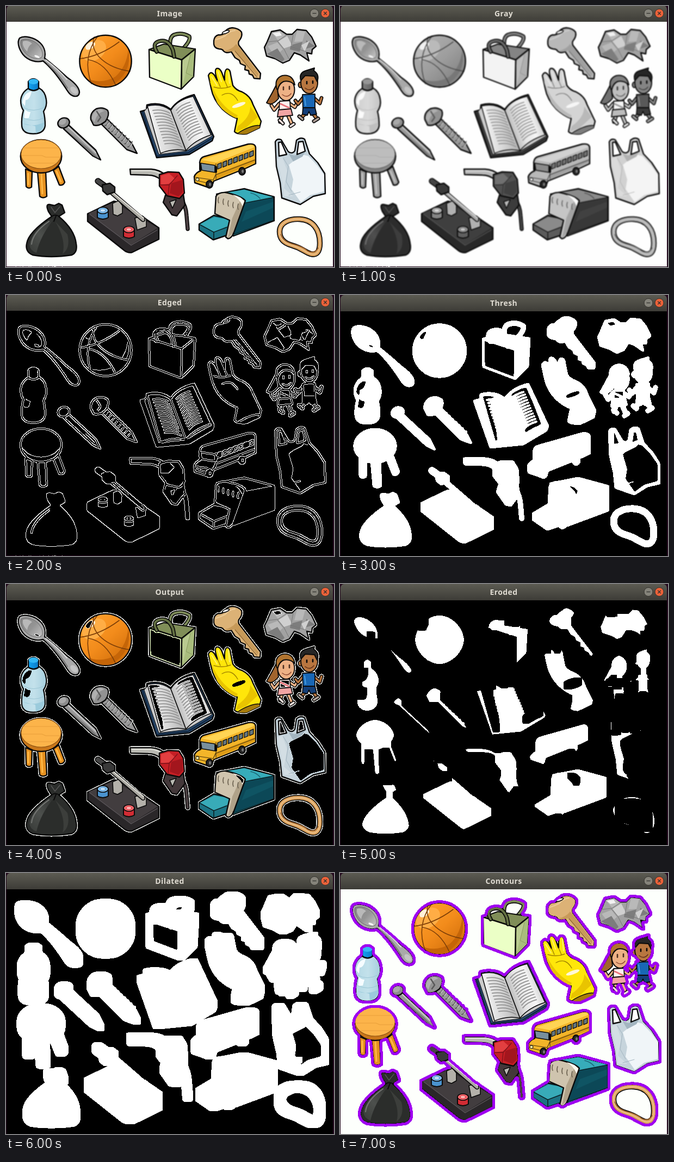
Recreate the animation shown at these times as an HTML page with a canvas. Size 603 px wide and 480 px high, loop 8000 ms.

```html
<!DOCTYPE html>
<html lang="en">
<head>
<meta charset="utf-8">
<title>Image processing steps</title>
<style>
  html, body { margin: 0; width: 100%; height: 100%; overflow: hidden; background: #2c001e; }
  canvas { display: block; width: 100vw; height: 100vh; }
</style>
</head>
<body>
<canvas id="stage" width="603" height="480"></canvas>
<script>
const W = 600, H = 450, N = W * H, INK = '#0a0a0a', EDGE = 2.4;
const screen2d = document.getElementById('stage').getContext('2d');
const sceneCanvas = Object.assign(document.createElement('canvas'), { width: W, height: H });
const ctx = sceneCanvas.getContext('2d', { willReadFrequently: true });

// ---------- drawing helpers (stage coordinates) ----------
function paint(path, fill, width, color) {
  if (fill) { ctx.fillStyle = fill; ctx.fill(path); }
  if (width) { ctx.lineWidth = width; ctx.strokeStyle = color; ctx.stroke(path); }
}
const shape = (fill, d, width = 0, color = INK) => paint(new Path2D(d), fill, width, color);
const line = (color, width, d) => shape(null, d, width, color);
const tube = (color, width, d) => { line(INK, width + 3.4, d); line(color, width, d); };
function oval(fill, x, y, rx, ry, turn = 0, width = 0, color = INK) {
  const path = new Path2D();
  path.ellipse(x, y, rx, ry, turn, 0, 7);
  paint(path, fill, width, color);
}
function blend(x0, y0, x1, y1, ...colors) {
  const g = ctx.createLinearGradient(x0, y0, x1, y1);
  colors.forEach((c, i) => g.addColorStop(i / (colors.length - 1), c));
  return g;
}
function inside(d, draw) {
  ctx.save();
  ctx.clip(new Path2D(d));
  draw();
  ctx.restore();
}

// ---------- the objects ----------
function spoon() {
  shape('#a9a9a9', 'M25 59C33 54 52 57 63 68C72 77 73 88 71 96C85 107 100 120 112 131C125 140 135 150 135 159Q134 167 126 166C117 165 113 156 107 147C97 132 84 114 68 101C56 105 40 100 31 89C23 78 20 66 25 59Z', EDGE);
  shape(blend(30, 62, 66, 96, '#858585', '#949494', '#c4c4c4'), 'M28 63C36 58 50 62 59 71C67 80 69 90 65 95C56 99 43 95 35 86C28 78 25 68 28 63Z', 1, '#6a6a6a');
  shape('#b9b9b9', 'M31 65Q40 62 48 69Q40 74 39 84Q29 74 31 65Z');
  oval('#f4f4f4', 57, 93, 5, 2, .4);
  line('#ddd', 2, 'M73 99Q96 116 112 135');
  line('#777', 2, 'M76 106Q99 127 113 151');
  oval('#c4c4c4', 125, 155, 8, 5, .8);
}

function basketball() {
  oval(blend(150, 62, 220, 140, '#ffa02c', '#f28b1b', '#cf6d0a'), 183, 101.5, 47.7, 47.7);
  shape('#c56508', 'M225 79Q233 126 191 148Q162 151 147 133Q176 145 201 130Q222 112 225 79Z');
  oval('#ffad45', 162, 82, 24, 17, -.6);
  oval('#fff0d8', 155, 73, 10, 6, -.6);
  line('#7d3f08', 1.6, 'M169 55Q139 95 157 143M162 57C152 88 186 114 228 120M135 97Q172 93 208 66M152 99Q183 104 202 146');
  oval(null, 183, 101.5, 47.7, 47.7, 0, EDGE);
}

function paperBag() {
  tube('#7c8a58', 4, 'M302 76Q300 57 309 53Q323 48 337 56Q340 63 325 79');
  shape('#808e58', 'M263 80L290 70L348 79L323 99Z', 2);
  shape('#a9bd7d', 'M323 99L348 79L345 130L322 153Z', EDGE);
  shape('#b9ca90', 'M325 101L339 90L331 121L325 145Z');
  line('#8b9c62', 1, 'M339 90L331 123L345 130');
  shape('#ebffc6', 'M263 80L323 99L322 153L264 131Z', EDGE);
  tube('#647143', 4, 'M277 84Q268 69 281 65Q299 60 307 82L309 93');
}

function key() {
  shape('#dcb276', 'M382 64Q383 55 391 53Q397 54 401 50Q405 41 416 40Q428 41 433 48Q435 55 430 62Q426 66 428 72L468 124L467 134L456 133L453 127L447 125L446 119L439 117L440 110L431 106L429 100L421 95L414 84Q405 88 400 83Q398 79 392 79Q383 78 382 70Z', EDGE);
  shape('#c79a59', 'M403 82Q415 80 423 70L428 75L464 124L463 129L420 82Q408 86 403 82Z');
  line('#eccb98', 2, 'M386 62Q395 59 403 55Q410 46 421 45');
  line('#8d6632', 1.2, 'M421 83L461 130');
  oval('#fff', 404, 48, 7, 2.5, -.35, 1.6);
}

function foil() {
  shape('#a2a2a2', 'M475 76L480 66L488 47L504 44L516 52L526 52L535 43L552 45L562 57L570 74L563 80L562 88L553 86L557 101L541 90L530 86L521 100L509 105L495 97L479 92Z', EDGE);
  shape('#b9b9b9', 'M489 49L503 46L514 54L500 63ZM481 74L499 67L509 80L495 92ZM535 46L550 47L545 65L530 66Z');
  shape('#7d7d7d', 'M480 88L499 78L512 98L507 103ZM523 72L545 66L540 84L522 80ZM552 63L568 74L550 79Z');
  shape('#d0d0d0', 'M501 65L517 55L526 73L511 78ZM543 72L558 64L549 84Z');
  shape('#f2f2f2', 'M490 50L503 48L507 54L497 56Z');
  line('#777', 1, 'M481 66L500 64L516 53M499 65L511 79L521 99M528 52L524 75L552 84');
}

function bottle() {
  shape(blend(28, 0, 75, 0, '#b4d9e5', '#c3e1eb', '#a5cedd'), 'M42 151Q28 159 27 174Q27 185 32 192Q28 205 29 221Q31 235 50 235Q70 235 72 220Q72 205 69 194Q76 184 74 172Q72 157 61 151Z', EDGE);
  shape('#f6fcff', 'M47 157Q32 160 30 178L35 184L36 173Q44 173 47 157ZM35 190Q39 195 45 195L42 206L33 207Z');
  shape('#9bcbdc', 'M31 216Q48 224 70 214Q69 229 55 234L54 221Z');
  line('#9cc7d6', 1, 'M32 206Q52 215 69 206M33 187Q50 197 71 186');
  shape(blend(41, 0, 60, 0, '#12a5f2', '#0b79c8'), 'M41 139Q50 129 60 139V152Q51 159 41 152Z', EDGE);
  oval('#32b7f5', 50.5, 139, 9, 5);
}

function nail() {
  shape('#999', 'M112 216L165 265L174 283L160 276L106 226Z', EDGE);
  line('#c8c8c8', 2, 'M113 221L165 270');
  shape('#747474', 'M108 226L159 274L171 281L154 264Z');
  oval('#8c8c8c', 106, 215, 11, 9, -.4, EDGE);
  oval('#a9a9a9', 104, 213, 7, 5, -.5);
}

function screw() {
  shape('#999', 'M184 206L231 252L241 271L222 264L176 218Z', EDGE);
  for (let i = 0; i < 8; i++) {
    const x = 182 + i * 6, y = 220 + i * 5.6;
    line('#5a5a5a', 1.8, `M${x} ${y}Q${x + 5} ${y - 1} ${x + 8} ${y - 10}`);
    line('#c5c5c5', 1.5, `M${x + 4} ${y - 1}L${x + 8} ${y - 6}`);
  }
  shape('#929292', 'M156 209Q154 196 166 189Q178 185 187 192Q191 200 183 212Q171 222 161 219Z', EDGE);
  shape('#b0b0b0', 'M158 207Q159 192 174 190L181 193Q166 197 163 214Z');
  line('#5a5a5a', 2.5, 'M167 194L174 205L169 212');
}

function book() {
  shape('#28486b', 'M247 194L258 191L259 182Q284 175 303 190Q317 170 346 163L382 240L379 248L337 273L277 279Z', EDGE);
  shape('#cbcbcb', 'M254 194L281 273L331 267L379 239L344 166L303 192L263 184Z', 1);
  shape(blend(265, 220, 323, 215, '#f4f4f4', '#d9d9d9', '#b4b4b4'), 'M260 184Q285 178 303 192L331 266Q308 261 284 271Z', 1.5);
  shape(blend(310, 222, 368, 200, '#b4b4b4', '#e6e6e6', '#f6f6f6', '#c9c9c9'), 'M303 192Q314 173 344 166L377 237Q346 247 331 266Z', 1.5);
  for (let i = 0; i < 12; i++) {
    const y = 192 + i * 5.6, x = 270 + i * 2, rx = 313 + i * 2.1, ry = 192 + i * 5;
    line('#999', 2, `M${x} ${y}Q${x + 17} ${y - 3} ${x + 31} ${y + 5}`);
    line('#999', 2, `M${rx} ${ry}Q${rx + 9} ${ry - 11} ${rx + 25} ${ry - 15}`);
  }
  line('#0d2139', 2, 'M251 195L277 276L335 270L379 243');
}

function glove() {
  const hand = 'M372 128Q376 118 383 127L389 138Q382 118 387 115Q393 113 397 123L402 137Q401 118 406 116Q412 115 413 126L417 146Q423 155 434 158Q450 166 454 181L469 212L466 224L443 235Q425 237 420 231L425 207Q411 202 397 189Q381 172 377 151Z';
  shape('#ffe60a', hand, EDGE);
  inside(hand, () => {
    shape('#e9c400', 'M372 132L383 157Q399 188 426 201L418 220L395 198ZM449 185Q449 205 426 221L423 231L441 224L463 204Z');
    oval('#a87c0c', 444, 232, 26, 7, -.42, 1.5);
    oval('#fff8d8', 428, 182, 13, 3.5, -.35);
  });
  line('#a08200', 1.4, 'M389 137L394 149M402 137L407 149M382 149Q398 154 413 148M397 164Q415 154 426 174');
  line('#fff26b', 2, 'M390 121L396 139M409 121L411 142M378 130L388 146');
}

function girl() {
  const skin = '#edb185';
  shape('#a1642d', 'M498 143Q489 161 479 178Q489 185 501 170Z', 2);
  tube(skin, 3.5, 'M502 180L493 191L488 183');
  tube(skin, 3.5, 'M522 180L531 186L535 179');
  tube(skin, 4, 'M507 203L504 213');
  tube(skin, 4, 'M519 202L525 216');
  tube('#eee0dc', 3.5, 'M503 210L509 216');
  tube('#eee0dc', 3.5, 'M523 221L529 217');
  shape('#fff0ee', 'M503 175L522 174L523 192L502 194Z', 1.8);
  shape('#f2a5a4', 'M501 191L524 189L527 201L499 204Z', 1.8);
  line('#e77178', 3, 'M505 180L520 187');
  oval(skin, 515, 154, 15.5, 20, 0, 2);
  shape('#b1742f', 'M498 153Q492 134 508 128Q527 125 531 145Q521 136 510 139Q502 143 500 153Z', 2);
  line('#4d3022', 2.6, 'M510 149V154M521 148V153');
  line('#8d4932', 1.5, 'M508 163Q517 170 524 161');
}

function boy() {
  const skin = '#b87640';
  tube(skin, 3.5, 'M546 169L537 180L532 174');
  tube(skin, 3.5, 'M567 170L577 179L580 169');
  tube(skin, 4, 'M551 197L543 205');
  tube(skin, 4, 'M564 197L570 205');
  tube('#b1a29a', 3.5, 'M539 203L545 208');
  tube('#b1a29a', 3.5, 'M566 212L574 207');
  shape('#1967b5', 'M545 163L568 162L568 190L546 190Z', 1.8);
  shape('#143f78', 'M546 187L568 187L571 199L560 201L557 194L554 201L545 199Z', 1.8);
  line('#479de0', 2, 'M549 168L551 183');
  oval(skin, 541, 145, 3.5, 5, 0, 2);
  oval(skin, 557.5, 141, 15.5, 20, 0, 2);
  shape('#262626', 'M542 137Q538 123 551 119L567 114L566 119Q577 126 572 139L567 129L550 128Z', 2);
  line(INK, 2.6, 'M553 139V143M564 138V142');
  line('#5e2f19', 1.5, 'M550 151Q559 158 566 149');
}

function stool() {
  shape('#e5901f', 'M36 300L48 305L47 333Q41 337 37 332ZM58 305L73 304L75 350Q68 355 62 350ZM87 302L97 295L108 324Q105 331 98 329Z', EDGE);
  line('#ffb845', 3, 'M41 308V328M65 309L67 345M93 304L101 323');
  oval('#c9771a', 64.5, 276.5, 37.8, 30.5, 0, EDGE);
  oval('#fcb44a', 64.5, 272.5, 36.8, 26.5, 0, 1.2, '#8f5313');
  line('#e9a03a', 1.2, 'M32 261H97M29 275H66L73 278H99M37 289H92');
}

function bus() {
  shape('#f3b529', 'M356 288Q357 279 364 277L445 254Q458 252 459 260V290L442 298L382 322Q379 334 370 333L347 325L346 314Q349 306 358 303Z', EDGE);
  shape('#ffd454', 'M359 283L446 256Q456 255 456 260L386 288Z');
  shape('#de9c17', 'M387 308L457 281V288L387 318Z');
  shape('#788f9d', 'M358 289L384 293V306L360 302Z', 1.6);
  for (let i = 0; i < 7; i++) {
    const x = 389 + i * 9.8, y = 291 - i * 3.7;
    shape('#64767e', `M${x} ${y}l7 -3v9l-7 3Z`, 1.3);
  }
  line('#4a360c', 1.2, 'M386 290V318M387 310L458 283M348 315L381 320L386 309M351 321L376 327');
  oval('#fff0a2', 352, 319, 3, 3, 0, 1);
  oval('#252525', 374, 328, 6, 7, 0, 2);
  oval('#777', 375, 328, 2, 3);
  oval('#252525', 434, 304, 6, 7, 0, 2);
  oval('#777', 435, 304, 2, 3);
  line(INK, 4, 'M386 296V305M357 291V301');
}

function plasticBag() {
  shape('#c6d4dc', 'M495 250Q498 243 506 246L519 268Q527 273 531 266L534 247Q542 240 549 245L558 272L573 288L586 308L587 345L565 350L541 365L507 353L504 325L497 295Z', EDGE);
  shape('#f0f5f8', 'M520 292L544 273L556 276L572 293L585 311L584 341L559 348L542 361L525 337L528 319Z');
  shape('#d3dee4', 'M498 281L508 278L517 303L511 335L528 350L511 350L508 325Z');
  shape('#a3b5c0', 'M519 271L530 275L550 268L545 277L528 286Z');
  shape('#fff', 'M501 251L506 250L516 273L502 276ZM538 250L546 249L550 267L535 273Z', EDGE);
  line('#a3b5c0', 1, 'M510 280L519 295L515 323L525 341M520 348L541 342');
}

function trashBag() {
  shape('#2b2d2b', 'M84 387L78 378Q72 364 80 365L89 367L97 363L103 366L108 380L97 387Q126 411 129 437Q132 453 121 458Q82 464 49 458Q35 452 38 437Q41 416 84 387Z', EDGE);
  shape(blend(43, 450, 93, 405, '#3a3d3a', '#4d504d', '#343634'), 'M82 392Q48 414 43 439Q44 450 56 454Q63 423 88 392Z');
  shape('#3c3e3b', 'M91 397L113 420Q119 445 104 456Q111 431 91 397Z');
  line('#757774', 2, 'M79 396Q49 417 47 438');
  line('#555', 1.5, 'M83 370L90 380L99 369');
  line(INK, 2, 'M84 387Q90 382 98 387M92 386L88 396');
}

function knifeSwitch() {
  shape('#2a2729', 'M150 382L198 359Q210 359 281 408V429L232 453Q225 455 218 450L150 396Z', EDGE);
  shape('#423d3f', 'M152 381L199 361L279 408L230 439Z');
  line('#5d585c', 1.3, 'M154 383L230 440L278 412');
  shape('#b4b1aa', 'M196 363L207 358L214 367V381L205 386L197 383Z', 1.6);
  shape('#b4b1aa', 'M237 390L251 386L258 392V406L241 412Z', 1.6);
  tube('#aaa8a1', 5, 'M195 344L252 393');
  line('#e1e0d9', 2, 'M195 342L253 390');
  tube('#444', 8, 'M169 322L183 332');
  shape('#393939', 'M177 329L191 326L200 333V342L186 347L178 340Z', EDGE);
  for (const [x, y, dark, light, top] of [[178, 380, '#4a93cf', '#82bdec', '#c5e0f6'], [226, 415, '#d22c34', '#f4676b', '#fbb3b3']]) {
    shape(dark, `M${x - 10} ${y - 4}V${y + 9}Q${x} ${y + 15} ${x + 10} ${y + 9}V${y - 4}Z`, 2);
    oval(light, x, y - 4, 10, 6, 0, 1.6);
    oval(top, x, y - 4, 5, 3, 0, 1, dark);
  }
}

function nozzle() {
  tube('#4c4143', 4, 'M322 357Q331 367 332 386L334 410');
  shape('#b9b9b2', 'M228 300L267 300Q282 301 292 310L284 319Q274 311 262 311L229 310Z', EDGE);
  line('#e0e0d9', 2, 'M232 303H266Q279 304 288 311');
  shape('#43383a', 'M293 348L289 361L305 384L314 386L329 366L326 346Z', EDGE);
  shape('#b9b9b2', 'M301 360L313 356L306 372Z', 1.5);
  shape('#c51f25', 'M282 310L298 305L318 306L326 319L328 344L319 354L296 349L282 331Z', EDGE);
  shape('#e23f40', 'M285 312L300 308L311 318L299 327L285 329Z');
  shape('#a3161d', 'M304 326L324 320L325 342L317 350L301 344Z');
  line('#7a1219', 1.3, 'M283 329L300 329L315 312M300 329L298 348');
}

function tealBox() {
  shape('#218d9c', 'M387 346L438 336L493 351V395L418 423L400 380Z', EDGE);
  shape('#37acba', 'M397 344L438 338L490 351L440 361Z');
  shape('#0c4857', 'M440 362L492 352V394L419 420Z', 1);
  shape('#0f5463', 'M441 378L491 360V371L433 397Z');
  line('#1c6674', 1.6, 'M450 344Q460 346 467 354');
  shape('#1c7383', 'M355 401L382 385L414 392L408 421L381 430L355 412Z', EDGE);
  shape('#38abb8', 'M357 401L383 388L412 393L407 405L382 415Z');
  line(INK, 1.3, 'M356 402L382 416L406 407M382 416V428');
  shape('#cfc4ae', 'M386 350Q391 342 404 343Q432 349 440 358L419 415Q416 427 408 428L404 425L411 394L384 382Z', EDGE);
  shape('#b0a289', 'M432 355L438 360L418 416L408 427L416 390Z');
  shape('#fffaf0', 'M417 347Q432 350 438 359L435 368Q429 354 417 347Z');
  for (let i = 0; i < 5; i++) line('#736957', 1.8, `M${391 + i * 9} ${352 + i * 3}q-2 6 0 10`);
}

function rubberBand() {
  const loop = 'M503 415C503 397 523 391 540 392C564 393 577 411 577 436C577 452 571 459 560 456C548 452 546 446 525 440C511 436 503 428 503 415Z';
  tube('#d99f5a', 7, loop);
  line('#eec28a', 2, loop);
  line('#8b5527', 1.5, 'M505 420Q509 432 525 437Q548 443 554 450Q566 457 574 445');
}

function drawScene() {
  ctx.fillStyle = '#fdfffc';
  ctx.fillRect(0, 0, W, H);
  ctx.translate(-1, -29);
  ctx.lineJoin = ctx.lineCap = 'round';
  [spoon, basketball, paperBag, key, foil, bottle, nail, screw, book, glove, girl, boy,
    stool, bus, plasticBag, trashBag, knifeSwitch, nozzle, tealBox, rubberBand].forEach(draw => draw());
  return ctx.getImageData(0, 0, W, H);
}

// ---------- image processing ----------
const around = [-W - 1, -W, -W + 1, -1, 1, W - 1, W, W + 1];
const blur = (a, step) => a.map((_, i) =>
  [1, 4, 6, 4, 1].reduce((sum, k, j) => sum + k * (a[i + (j - 2) * step] ?? 254), 0) / 16);

function spread(a, n, pick) {
  const along = (src, step) => src.map((v, i) => {
    for (let j = -n; j <= n; j++) v = pick(v, src[i + j * step] ?? v);
    return v;
  });
  return along(along(a, 1), W);
}

// Grow a region from its seeds through every accepted pixel.
function flood(seeds, steps, accept) {
  const seen = new Uint8Array(N), stack = [...seeds];
  stack.forEach(i => seen[i] = 1);
  while (stack.length) {
    const i = stack.pop();
    for (const step of steps) {
      const j = i + step;
      if (j >= 0 && j < N && !seen[j] && accept(j)) { seen[j] = 1; stack.push(j); }
    }
  }
  return seen;
}

function canny(g, low, high) {
  const mag = new Float32Array(N), across = new Int16Array(N), strong = [];
  for (let i = W + 1; i < N - W - 1; i++) {
    const diagonal = g[i + W + 1] - g[i - W - 1], anti = g[i - W + 1] - g[i + W - 1];
    const gx = diagonal + anti + 2 * (g[i + 1] - g[i - 1]);
    const gy = diagonal - anti + 2 * (g[i + W] - g[i - W]);
    const ax = Math.abs(gx), ay = Math.abs(gy);
    mag[i] = ax + ay;
    across[i] = ay < .414 * ax ? 1 : ay > 2.414 * ax ? W : gx * gy > 0 ? W + 1 : W - 1;
  }
  const peak = i => mag[i] > low && mag[i] > mag[i - across[i]] && mag[i] >= mag[i + across[i]];
  for (let i = 0; i < N; i++) if (mag[i] > high && peak(i)) strong.push(i);
  return flood(strong, around, peak);
}

function outlines(mask) {
  const outside = flood([0], [-1, 1, -W, W], i => !mask[i]);
  const band = new Uint8Array(N);
  for (let i = 0; i < N; i++) {
    if (!mask[i] || ![-1, 1, -W, W].some(s => outside[i + s])) continue;
    for (let y = -2; y <= 2; y++)
      for (let x = -2; x <= 2; x++) if (x * x + y * y <= 5) band[i + y * W + x] = 1;
  }
  return band;
}

function view(pixel) {
  const out = new ImageData(W, H);
  for (let i = 0; i < N; i++) {
    const [r, g, b] = pixel(i), o = i * 4;
    out.data[o] = r; out.data[o + 1] = g; out.data[o + 2] = b; out.data[o + 3] = 255;
  }
  return out;
}
const grayView = (a, scale = 255) => view(i => { const v = a[i] * scale; return [v, v, v]; });

const image = drawScene(), px = image.data;
const gray = Float32Array.from({ length: N }, (_, i) => .299 * px[i * 4] + .587 * px[i * 4 + 1] + .114 * px[i * 4 + 2]);
const soft = blur(blur(gray, 1), W).map(Math.round);
const mask = Uint8Array.from(soft, v => v <= 225 ? 1 : 0);
const band = outlines(mask);
const color = i => [px[i * 4], px[i * 4 + 1], px[i * 4 + 2]];

const steps = [
  ['Image', image],
  ['Gray', grayView(soft, 1)],
  ['Edged', grayView(canny(soft, 30, 150))],
  ['Thresh', grayView(mask)],
  ['Output', view(i => mask[i] ? color(i) : [0, 0, 0])],
  ['Eroded', grayView(spread(mask, 5, Math.min))],
  ['Dilated', grayView(spread(mask, 5, Math.max))],
  ['Contours', view(i => band[i] ? [159, 0, 240] : color(i))]
];

// ---------- window ----------
function button(x, y, fill, mark) {
  const c = screen2d;
  c.beginPath();
  c.arc(x, y, 8, 0, 7);
  c.fillStyle = fill;
  c.fill();
  c.lineWidth = 1;
  c.strokeStyle = '#33322e';
  c.stroke();
  c.translate(x, y);
  c.lineWidth = 1.3;
  c.stroke(new Path2D(mark));
  c.translate(-x, -y);
}

function drawWindow(index) {
  const c = screen2d, [title, picture] = steps[index], top = index < 3 ? 29 : 30;
  c.fillStyle = '#240a1e';
  c.fillRect(0, 0, 603, 480);
  c.fillStyle = '#b9b3b6';
  c.font = '12px "DejaVu Sans Mono", monospace';
  c.textAlign = 'left';
  c.fillText('lib/build/Debug', 15, 488);
  const bar = c.createLinearGradient(0, 0, 0, top);
  bar.addColorStop(0, '#5c5b52');
  bar.addColorStop(1, '#3d3c37');
  c.fillStyle = bar;
  c.beginPath();
  c.roundRect(1, top - 30, 600, 30, [7, 7, 0, 0]);
  c.fill();
  c.fillStyle = '#dfdbd2';
  c.font = 'bold 14px "Noto Sans", "Open Sans", sans-serif';
  c.letterSpacing = '0.4px';
  c.textAlign = 'center';
  c.fillText(title, 301, top - 10);
  c.letterSpacing = '0px';
  button(567, top - 15.5, '#85837a', 'M-3.5 0H3.5');
  button(587, top - 15.5, '#ed6239', 'M-2.7 -2.7L2.7 2.7M2.7 -2.7L-2.7 2.7');
  c.putImageData(picture, 1, top);
}

let shown = -1;
function tick() {
  const index = Math.floor(performance.now() / 1000) % steps.length;
  if (index !== shown) drawWindow(shown = index);
  requestAnimationFrame(tick);
}
tick();
</script>
</body>
</html>
```
